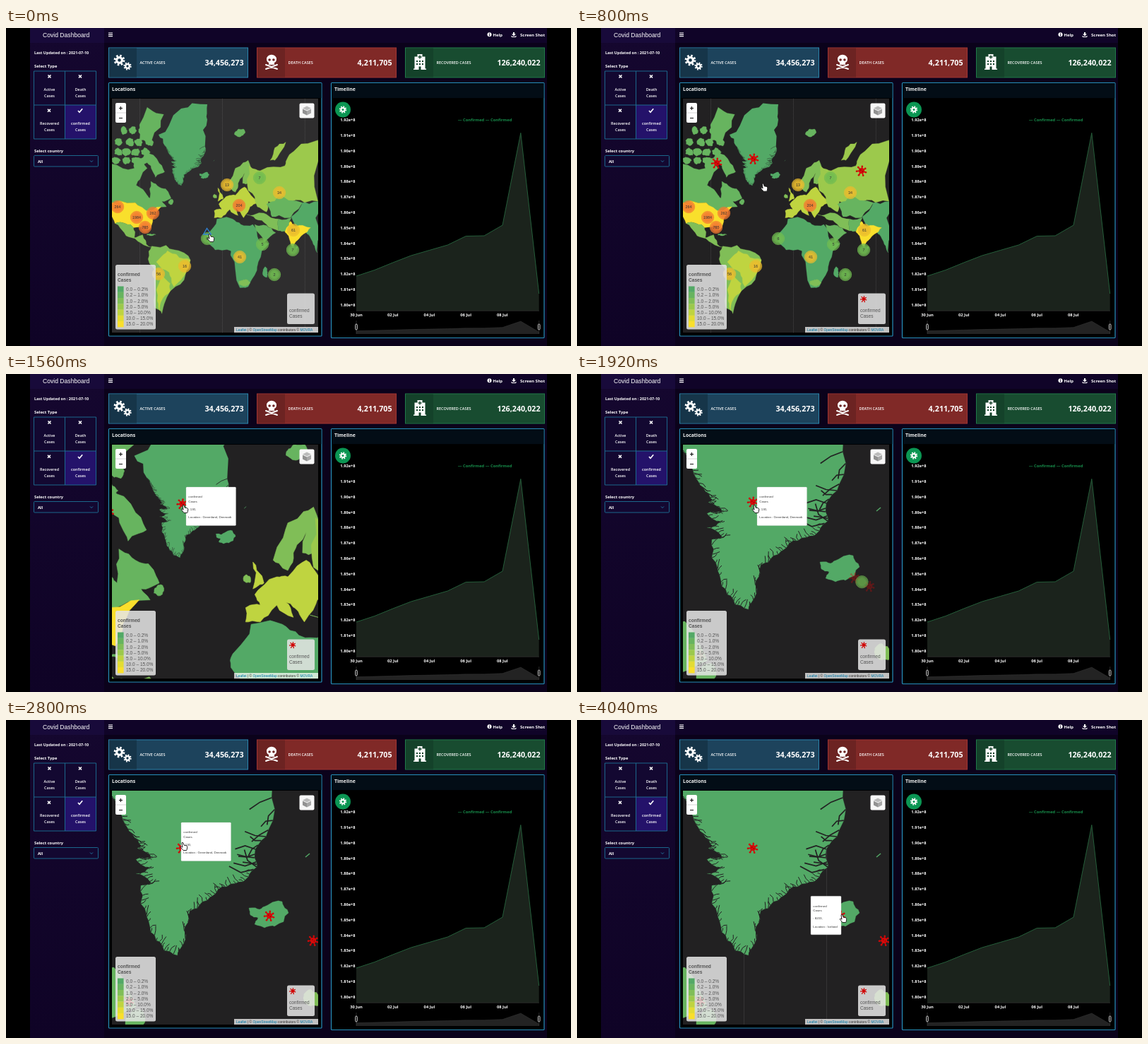
Write an HTML page that moves like this. It is 800 px wide and 450 px high and loops after 4.08 s.

```html
<!DOCTYPE html>
<html lang="en">
<head>
<meta charset="utf-8">
<title>Covid Dashboard</title>
<style>
html, body { margin: 0; width: 100%; height: 100%; overflow: hidden; background: #000; }
svg { display: block; width: 100vw; height: 100vh; }
text { font-family: "Open Sans", "Noto Sans", sans-serif; white-space: pre; }
.h, .h text { font-family: "Liberation Sans", Arial, sans-serif; }
</style>
</head>
<body>
<svg id="stage" viewBox="0 0 800 450"></svg>
<script>
const LOOP = 4080;
const clamp = v => Math.max(0, Math.min(1, v));
const ramp = (t, a, b) => clamp((t - a) / (b - a));
const ease = p => p * p * (3 - 2 * p);
const range = (n, f) => Array.from({ length: n }, (_, i) => f(i));
const noise = n => { const s = Math.sin(n * 127.1 + 3.7) * 43758.5; return s - Math.floor(s); };

// ---------- drawing helpers ----------
const rect = (x, y, w, h, fill, more = '') =>
  `<rect x="${x}" y="${y}" width="${w}" height="${h}" fill="${fill}" ${more}/>`;
const circle = (x, y, r, fill, more = '') =>
  `<circle cx="${x}" cy="${y}" r="${r}" fill="${fill}" ${more}/>`;
const path = (d, fill, more = '') => `<path d="${d}" fill="${fill}" ${more}/>`;
const line = (d, color, w, more = '') => path(d, 'none', `stroke="${color}" stroke-width="${w}" ${more}`);
const text = (x, y, s, size, weight = 700, fill = '#fff', more = '') =>
  `<text x="${x}" y="${y}" font-size="${size}" font-weight="${weight}" fill="${fill}" ${more}>${s}</text>`;
const mid = 'text-anchor="middle"', end = 'text-anchor="end"';
const gear = (x, y, r, fill, hole) =>
  circle(x, y, r * .92, 'none', `stroke="${fill}" stroke-width="${r * .42}" stroke-dasharray="${r * .36}"`) +
  circle(x, y, r * .78, fill) + circle(x, y, r * .33, hole);

// ---------- geography ----------
const points = s => s.split(' ').map(p => p.split(',').map(Number));
const project = ([lon, lat]) =>
  [306.5 + 1.3 * lon, 320.5 - 74.5 * Math.asinh(Math.tan(lat * Math.PI / 180))];
// Split each edge with a wobble that is the same from either direction.
const roughen = pts => pts.flatMap((a, i) => {
  const b = pts[(i + 1) % pts.length], mx = (a[0] + b[0]) / 2, my = (a[1] + b[1]) / 2;
  const d = Math.hypot(b[0] - a[0], b[1] - a[1]) * .12;
  return [a, [mx + d * Math.sin(mx * 37 + my * 11), my + d * Math.cos(mx * 17 + my * 29)]];
});
const shape = (pts, fill, w = .3) =>
  path('M' + roughen(roughen(pts)).map(p => p.map(v => v.toFixed(1))).join('L') + 'Z', fill,
    `stroke="${fill}" stroke-width="${w}" stroke-linejoin="round"`);

const GREEN = '#53a966', SHADES = [GREEN, '#67b45f', '#80be57', '#9cc94c', '#bfd440', '#e3dc33', '#f9df2c'];
const region = (shade, s) => shape(points(s).map(project), SHADES[shade]);
const blob = (shade, lon, lat, w, h) => shape(range(7, i => {
  const a = i * Math.PI * 2 / 7, r = .8 + .4 * noise(lon + lat + i);
  return project([lon + w * r * Math.cos(a), lat + h * r * Math.sin(a)]);
}), SHADES[shade]);

// Canada's arctic islands: staggered rows that get smaller to the north.
const arcticIslands = range(15, i => {
  const row = Math.floor(i / 4), lat = 71 + row * 2.7;
  return blob(1, -117 + (i % 4) * 10 + row * 2 + 4 * noise(i), lat, 5 - row * .4, 1.3 - row * .15);
}).join('');
const americas = arcticIslands +
  region(1, '-125,70 -96,68 -94,72 -82,68 -94,60 -82,54 -79,52 -78,62 -69,59 -62,58 -56,52 -66,50 -61,46 -83,42 -95,49 -125,49') +
  region(1, '-63,66.5 -73,64 -78,69 -89,71 -83,74 -69,70') + region(1, '-90,77 -77,77 -64,82 -82,83') + blob(1, -56, 49.5, 3, 2) +
  region(6, '-125,49 -95,49 -83,43 -67,46 -76,36 -80,26 -84,30 -97,28 -106,32 -117,32 -125,42') +
  region(2, '-117,32 -106,32 -97,28 -96,18 -87,21 -83,11 -77,8 -92,14 -105,20') + blob(1, -78, 21, 5, 1) +
  region(2, '-77,9 -52,5 -35,-6 -40,-20 -57,-37 -66,-54 -74,-50 -70,-18 -81,-5') +
  region(4, '-60,4 -50,0 -35,-6 -40,-20 -53,-33 -58,-19 -72,-8') +
  region(4, '-57,-30 -57,-37 -65,-43 -68,-52 -71,-45 -66,-22');
const africa = region(0, '-6,36 11,36 20,31 33,31 43,12 51,12 39,-8 35,-22 28,-33 19,-34 9,-1 9,4 -8,5 -17,15 -16,22') +
  blob(2, 24, -29.5, 6, 3.5) + blob(0, 47, -19, 2.5, 6);
const europe = region(4, '-9,37 -9,43 -1,44 -4,48 8,54 14,54 24,59 31,54 40,49 30,46 23,37 19,42 13,45 17,39 8,44 -1,37') +
  region(2, '6,59 14,68 28,71 30,61 22,61 24,66 17,61 14,56') +
  region(4, '-5,50 1,52 -5,58.5') + blob(2, -8, 53.3, 2, 1.3) + blob(1, 19, 78.7, 6, .8);
const asia = region(3, '29,69 41,67 68,69 73,73 104,77 104,50 80,51 50,50 48,42 38,46 28,57') +
  region(3, '52,71 57,71 69,76.5 57,75') +
  region(1, '48,48 62,54 87,49 74,37 54,38') + region(2, '26,40 45,41 61,36 61,25 48,31 36,36') +
  region(1, '35,31 48,30 58,23 45,13') + region(1, '61,36 75,37 70,24 61,25') +
  region(0, '75,38 87,49 106,50 106,18 103,2 98,14 92,22 80,29') +
  region(6, '68,24 74,34 80,29 96,28 86,20 80,14 77,8 72,20') + blob(1, 81, 7.5, 1, 1.5);

// Greenland and Iceland live in a finer grid, four units per world unit.
const greenland = points('149,108 160,128 166,142 179,161 192,178 186,182 206,195 184,197 204,209 184,217 206,231 191,234 191,260 202,284 213,312 224,326 243,333 252,315 253,293 260,270 278,257 296,246 306,235 325,231 343,222 355,208 352,190 368,165 376,110 389,-40 389,-127 241,-103 113,45');
const iceland = points('344,266 359,268 366,264 391,257 400,273 380,292 366,294 352,289 357,280 346,276');
// Crooked fjords cut inland from the coast, longest on the east side.
const fjords = roughen(roughen(greenland)).filter(p => p[1] > 95).map(([x, y], i) => {
  const east = x > 330 && y < 212, a = Math.atan2(190 - y, 262 - x) + noise(i) - .5;
  const len = east ? 8 + 11 * noise(i + 50) : 2 + 5 * noise(i + 50), turn = a + 1.6 * (noise(i + 90) - .5);
  const step = b => `l${(Math.cos(b) * len).toFixed(1)},${(Math.sin(b) * len).toFixed(1)}`;
  return line(`M${x.toFixed(1)},${y.toFixed(1)}${step(a)}${step(turn)}`, '#222122', east ? 1.7 : 1);
}).join('');
const world = americas + africa + europe + asia + '<g transform="translate(187.75 139.75) scale(.25)">' +
  shape(greenland, GREEN) + shape(iceland, GREEN) + fjords + line('M424,194L430,189', GREEN, 1.5) + '</g>';

// ---------- markers ----------
const virus = range(7, i => {
  const a = i * Math.PI * 2 / 7 + .35, r = 6 + 1.8 * noise(i);
  const x = (Math.cos(a) * r).toFixed(1), y = (Math.sin(a) * r).toFixed(1);
  return line(`M0,0L${x},${y}`, '#cf0808', 1.7) + circle(x, y, 1.3, '#cf0808');
}).join('') + circle(0, 0, 4.1, '#d60a0a') + circle(-1.3, -1, .8, '#8a0000') + circle(1.4, 1, .7, '#8a0000');
const hueFor = n => n >= 200 ? '#f47a32' : n >= 10 ? '#ecbd2f' : '#72bd52';
const cluster = (n, label = n, hue = hueFor(n)) => circle(0, 0, 9, hue, 'fill-opacity=".4"') +
  [8.6, 6.7, 4.8].map(r => circle(0, 0, r, hue, `fill-opacity=".45" stroke="${hue}" stroke-width=".8" stroke-dasharray="1.5 .5"`)).join('') +
  text(0, 2, label, 5.4, 400, '#333', mid);
const clusters = points('158,253,264 185,268,1984 208,262,262 197,282,765 313,222,13 359,212,7 387,233,34 330,251,204 407,286,61 363,306,5 406,314,7 331,324,41 380,349,2 285,298,6 253,337,16 216,348,56');
const SPLIT = [288.6, 213.3];
const viruses = points('250,185 198,191 403,202 281,209 296.5,217.75 231.25,239.25');

// ---------- page ----------
const valueBox = (x, label, value, fill, dark, border, icon) =>
  rect(x, 28, 197, 42, fill, `stroke="${border}"`) + rect(x + .5, 28.5, 39, 41, dark) + icon +
  text(x + 44, 51, label, 5.5, 600) + text(x + 191, 53, value, 10.7, 700, '#fff', end);
const panel = (x, h, title) => rect(x, 77.5, 301.5, h, '#000', 'rx="1" stroke="#2690ba" stroke-width="1.2"') +
  rect(x + .6, 78.1, 300.3, 21, '#030d16') + text(x + 4.5, 89, title, 6.9, 700, '#f2f2f2');
const cross = (x, y) => line(`M${x - 2},${y - 2}l4,4m0,-4l-4,4`, '#fff', 1.6);
const choice = (x, y, a, b) => text(x, y, a, 5.4, 600, '#fff', mid) + text(x, y + 9, b, 5.4, 600, '#fff', mid);

const gears = gear(160.5, 45.5, 7, '#fff', '#163549') + gear(172, 54, 5, '#fff', '#163549');
const skull = '<g transform="translate(376 48)">' +
  line('M-8,4L8,10M8,4L-8,10', '#fff', 2, 'stroke-linecap="round"') +
  path('M-7,-4a7,6.3 0 0 1 14,0q0,4 -3,5v3h-8v-3q-3,-1 -3,-5z', '#fff') +
  circle(-2.9, -3, 1.8, '#6c2322') + circle(2.9, -3, 1.8, '#6c2322') + '</g>';
const hospital = '<g transform="translate(586 48)">' + path('M-9,11v-1.5h1.5v-17h4v-3.5h7v3.5h4v17h1.5v1.5z', '#fff') +
  line('M0,-9.5v5M-2.5,-7h5', '#14422a', 1.4) +
  range(6, i => rect(-5 + (i % 3) * 4, -2 + 4 * Math.floor(i / 3), 2, 2.2, '#14422a')).join('') +
  rect(-1.5, 6.5, 3, 4.5, '#14422a') + '</g>';

const sidebar = rect(34, 0, 105, 450, 'url(#side)') + rect(34, 0, 105, 21, '#180a3a') +
  `<g class="h">${text(52, 13, 'Covid Dashboard', 8.6, 400)}</g>` +
  text(40, 37.3, 'Last Updated on : 2021-07-10', 5.45) + text(40, 56, 'Select Type', 5.8) +
  rect(39.5, 61, 88, 96, '#130831') + rect(83.5, 109, 44, 48, '#24126a') +
  line('M39.5,61h88v96h-88zM83.5,61v96M39.5,109h88', '#1c7296', .9) +
  cross(61.5, 68.5) + cross(105, 68.5) + cross(61, 116.7) + line('M102,117l2,2.2l4.2,-5', '#fff', 1.6) +
  choice(61.5, 89, 'Active', 'Cases') + choice(105.5, 89, 'Death', 'Cases') +
  choice(61.5, 137, 'Recovered', 'Cases') + choice(105.5, 137, 'confirmed', 'Cases') +
  text(40, 176, 'Select country', 5.75) + rect(39.5, 180.5, 91, 15.5, '#130831', 'rx="1" stroke="#1c7296" stroke-width=".9"') +
  text(45, 190.5, 'All', 5.6) + line('M119,187.5l2,2l2,-2', '#2690ba', .8);

const topBar = rect(139, 0, 627, 21, '#100428') + line('M145,7h6M145,9.3h6M145,11.6h6', '#fff', 1.2) +
  circle(684.5, 9.3, 3, '#fff') + line('M684.5,7.2v1M684.5,8.9v2.4', '#100428', 1) + text(689.5, 11.6, 'Help', 5.9) +
  path('M718,6h2v2.6h2l-3,3l-3,-3h2z', '#fff') + line('M716,11v1.6h6v-1.6', '#fff', 1) + text(728, 11.6, 'Screen Shot', 6);

const days = [351, 342.5, 332, 322, 314.5, 307, 294.5, 294, 279, 148.5, 376];
const plot = scaleY => days.map((y, i) => `${(496 + 25.87 * i).toFixed(1)},${scaleY(y).toFixed(1)}`).join('L');
const curve = plot(y => y), overview = plot(y => 415 + (y - 148.5) * .067);
const chart = panel(460.5, 361, 'Timeline') + circle(477, 115.5, 11, '#0b9653') + gear(477, 115.5, 4.6, '#fff', '#0b9653') +
  text(678, 132.3, '— Confirmed — Confirmed', 5.75, 700, '#178c4a', mid) +
  path(`M${curve}V400H496Z`, '#1b231c') + line(`M${curve}`, '#27663f', .9) + line('M496,400.3H755', '#3c3c3c', .6) +
  range(13, i => text(494.5, 132.2 + i * 21.8, `1.${92 - i}e+8`, 5.7, 700, '#fff', end)).join('') +
  ['30 Jun', '02 Jul', '04 Jul', '06 Jul', '08 Jul'].map((s, i) => text(496 + i * 51.7, 408, s, 5.8, 700, '#fff', mid)).join('') +
  path(`M${overview}V433H496Z`, '#232323') + line(`M${overview}`, '#3a3a3a', .5) +
  [496, 754.7].map(x => line(`M${x},414v19`, '#444', .6) + rect(x - 1.3, 419, 2.6, 8, '#111', 'rx="1.3" stroke="#ddd" stroke-width=".9"')).join('');

const steps = ['0.0', '0.2', '1.0', '2.0', '5.0', '10.0', '15.0', '20.0'];
const link = s => `<tspan fill="#0078a8">${s}</tspan>`;
const controls = '<g class="h">' + rect(155, 106, 15, 28, '#fff', 'rx="2"') + line('M155,120h15', '#bbb', .6) +
  line('M160,113.5h5M162.5,111v5M160,127.5h5', '#111', 1.1) +
  rect(415.5, 106.5, 21, 21, '#f7f7f7', 'rx="2"') +
  path('M426,110.5l6,3l-6,3l-6,-3z', '#bbb') + path('M420,114.5l6,3v6l-6,-3z', '#929292') + path('M432,114.5l-6,3v6l6,-3z', '#a8a8a8') +
  rect(155, 335, 57, 91.5, '#e6e6e6', 'rx="2.5" opacity=".86"') +
  text(158, 351, 'confirmed', 6.6, 700, '#555') + text(158, 359, 'Cases', 6.6, 700, '#555') +
  SHADES.map((c, i) => rect(158, 365.5 + i * 8.25, 8.6, 8.35, c) +
    text(170, 372.2 + i * 8.2, `${steps[i]} – ${steps[i + 1]}%`, 6.5, 400, '#555')).join('') +
  rect(398, 375.5, 39, 43.5, '#e6e6e6', 'rx="2.5" opacity=".86"') +
  `<g id="legendIcon" transform="translate(406 383.5) scale(.6)">${virus}</g>` +
  text(401, 401.5, 'confirmed', 6.5, 400, '#555') + text(401, 409.5, 'Cases', 6.5, 400, '#555') +
  rect(323, 423, 119, 8, '#fff', 'opacity=".72"') +
  text(326, 428.8, `${link('Leaflet')} | © ${link('OpenStreetMap')} contributors © ${link('MOVRA')}`, 4.85, 400, '#333') + '</g>';

const tip = (id, w, h, rows) => `<g id="${id}" class="h">` + rect(0, 0, w, h, '#fff', 'rx="1.2" stroke="#ccc" stroke-width=".3"') +
  rows.map(([y, s]) => text(3.3, y, s, 4.4, 400, '#333')).join('') + '</g>';
const caseTip = (id, w, count, place) =>
  tip(id, w, 54.5, [[15.3, 'confirmed'], [22, 'Cases'], [33, `: ${count},`], [44.3, `Location : ${place}`]]);

const map = '<g clip-path="url(#mapClip)" class="h">' + rect(150, 100, 292, 331, '#222122', 'id="sea"') +
  `<g id="farSeams">${line('M189.5,100v331M306.5,100v331M423.3,100v331', '#686868', .5, 'stroke-dasharray="1 1"')}</g>` +
  `<g id="nearSeams">${line('M236.5,100v331M353.5,100v331', '#555', .4)}</g>` +
  `<g id="deepSeams">${line('M150,315h292', '#444', .4)}</g>` + `<g id="world">${world}</g>` +
  clusters.map(([, , n], i) => `<g id="cluster${i}">${cluster(n)}</g>`).join('') +
  line('M279.5,292L284.5,283.5L290.5,292Z', '#2f82d8', 1.3, 'id="coverage"') +
  viruses.map((_, i) => `<g id="virus${i}">${virus}</g>`).join('') + `<g id="split">${cluster(2, '')}</g>` +
  caseTip('greenlandTip', 70.5, 130, 'Greenland, Denmark') + caseTip('icelandTip', 43, 8233, 'Iceland') +
  tip('countryTip', 52, 14, [[8.4, 'Greenland: 6.657e-05']]) + controls +
  `<g id="cursor">${path('M-3,-5.2q1.2,-1 2,.2l1.2,3.3l2.7,.2q1.8,.4 1.8,2.2l-.5,3.5l-.6,1.3h-4.6l-3.6,-4.2q-.6,-1.4 1.1,-1.1l1.5,1z', '#fff', 'stroke="#111" stroke-width=".9" stroke-linejoin="round"')}</g></g>`;

const stage = document.getElementById('stage');
stage.innerHTML = `<defs><clipPath id="mapClip">${rect(150, 100, 292, 331, '#fff')}</clipPath>
  <linearGradient id="side" x2="0" y2="1"><stop stop-color="#15072f"/><stop offset="1" stop-color="#0f0326"/></linearGradient></defs>` +
  rect(0, 0, 800, 450, '#000') + rect(139, 0, 627, 450, '#0b021b') + topBar + sidebar +
  valueBox(145.5, 'ACTIVE CASES', '34,456,273', '#1d435c', '#163549', '#2b86ad', gears) +
  valueBox(355.5, 'DEATH CASES', '4,211,705', '#802927', '#6c2322', '#a03533', skull) +
  valueBox(565.5, 'RECOVERED CASES', '126,240,022', '#184c30', '#14422a', '#217a49', hospital) +
  panel(145.5, 358.5, 'Locations') + chart + map;

// ---------- motion ----------
const el = {};
stage.querySelectorAll('[id]').forEach(n => el[n.id] = n);
const place = (id, x, y) => el[id].setAttribute('transform', `translate(${x.toFixed(2)} ${y.toFixed(2)})`);
const fade = (id, o) => el[id].setAttribute('opacity', +o);
const within = (t, a, b) => t >= a && t < b;

// The pointer rests at each stop and glides to the next between the two times.
const stops = [
  { x: 290, y: 297 },
  { x: 253, y: 191, from: 480, to: 1000 },
  { x: 211, y: 202, from: 1960, to: 2200 },
  { x: 252, y: 179, from: 2640, to: 2780 },
  { x: 377, y: 281, from: 3040, to: 3600 },
];
const cursorAt = t => stops.reduce(([x, y], s) => {
  const p = s.from ? ease(ramp(t, s.from, s.to)) : 1;
  return [x + (s.x - x) * p, y + (s.y - y) * p];
}, [0, 0]);
// Wheel zooms keep the point below the cursor in place.
function cameraAt(t) {
  const level = ease(ramp(t, 1300, 1460)) + ease(ramp(t, 1600, 1760)) + ease(ramp(t, 2260, 2400)) - ease(ramp(t, 2600, 2720));
  const k = 2 ** level, base = Math.min(k, 4), r = k / base;
  const shift = (fixed, pivot) => r * fixed * (1 - base) + pivot * (1 - r);
  return [k, shift(250.333, 208), shift(186.333, 200)];
}

function draw(t) {
  const [k, tx, ty] = cameraAt(t), [cx, cy] = cursorAt(t);
  const toScreen = ([x, y]) => [k * x + tx, k * y + ty];
  el.world.setAttribute('transform', `translate(${tx} ${ty}) scale(${k})`);
  const grey = Math.round(46 - 12 * ramp(t, 0, 360));
  el.sea.setAttribute('fill', `rgb(${grey},${grey - 1},${grey})`);
  fade('farSeams', k === 1);
  fade('nearSeams', k === 4 && t > 3000);
  fade('deepSeams', k === 8);

  clusters.forEach((c, i) => {
    place('cluster' + i, ...toScreen(c));
    fade('cluster' + i, clamp(2 - k));
  });
  const spread = ramp(t, 1880, 2000), loaded = t >= 600;
  viruses.forEach((v, i) => {
    const fromSplit = i === 3 || i === 4;
    const p = fromSplit ? v.map((n, j) => SPLIT[j] + (n - SPLIT[j]) * spread) : v;
    place('virus' + i, ...toScreen(p));
    fade('virus' + i, i < 3 ? loaded : spread);
  });
  place('split', ...toScreen(SPLIT));
  fade('split', within(t, 1760, 2060) ? 1 - ramp(t, 1900, 2020) : 0);
  fade('coverage', t < 520);
  fade('legendIcon', loaded);

  const late = t > 2700;
  place('greenlandTip', late ? 248 : k > 1 ? 255 : 254, late ? 145 : 160);
  fade('greenlandTip', within(t, 1060, 1990) || within(t, 2760, 3080));
  place('countryTip', cx + 1, cy - 10);
  fade('countryTip', within(t, 1990, 2760) || within(t, 3080, 3270));
  place('icelandTip', 331, 249.3);
  fade('icelandTip', t >= 3540);
  place('cursor', cx, cy);
}

const start = performance.now();
function tick() {
  draw((performance.now() - start) % LOOP);
  requestAnimationFrame(tick);
}
tick();
</script>
</body>
</html>
```
